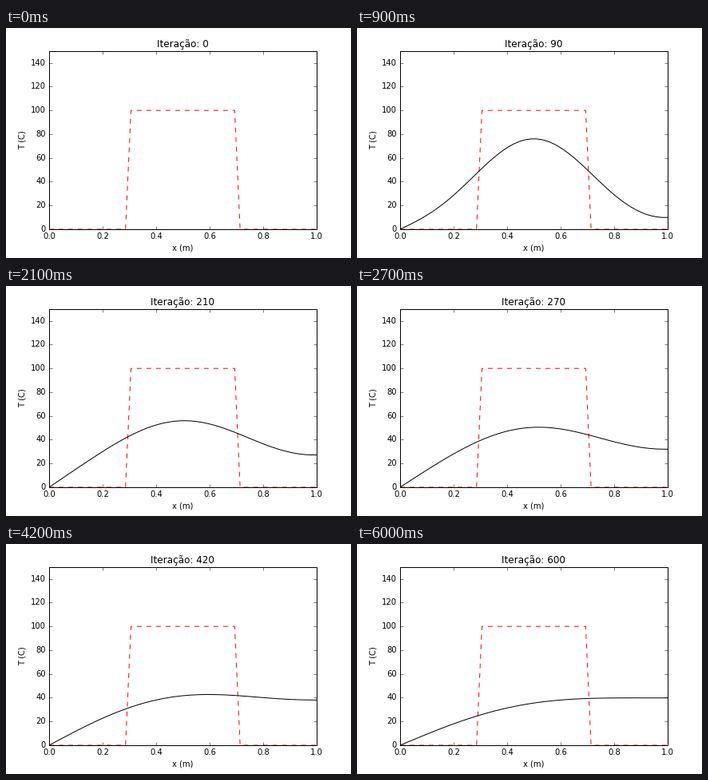
A matplotlib script for the animation above (6.1 s loop, 432 by 288 pixels).

```python
import numpy as np
import matplotlib.pyplot as plt
from matplotlib.animation import FuncAnimation

plt.style.use("classic")
plt.rcParams.update({
    "figure.dpi": 72,
    "savefig.dpi": "figure",
    "figure.facecolor": "white",
    "font.family": "DejaVu Sans",
    "font.size": 10,
})

POINTS = 50
FRAMES = 61
STEPS_PER_FRAME = 10
FOURIER = 0.4  # diffusivity * dt / dx**2

x = np.linspace(0, 1, POINTS)
initial = np.where((x >= 0.3) & (x <= 0.7), 100.0, 0.0)


def diffuse(temp):
    """One explicit step: cold left end, insulated right end."""
    new = temp.copy()
    new[1:-1] += FOURIER * (temp[2:] - 2 * temp[1:-1] + temp[:-2])
    new[0] = 0
    new[-1] = new[-2]
    return new


def solve():
    history = [initial]
    for _ in range(FRAMES - 1):
        temp = history[-1]
        for _ in range(STEPS_PER_FRAME):
            temp = diffuse(temp)
        history.append(temp)
    return history


profiles = solve()

fig = plt.figure(figsize=(6, 4))
fig.subplots_adjust(left=0.125, right=0.9, bottom=0.125, top=0.9)
ax = fig.add_subplot()
ax.plot(x, initial, "r--")
curve, = ax.plot([], [], "k-")
ax.set_xlim(0, 1)
ax.set_ylim(0, 150)
ax.set_xticks(np.linspace(0, 1, 6))
ax.set_yticks(range(0, 150, 20))
ax.set_xlabel("x (m)")
ax.set_ylabel("T (C)")
title = ax.set_title("")


def update(frame):
    # The curve only appears once the first steps are done.
    if frame == 0:
        curve.set_data([], [])
    else:
        curve.set_data(x, profiles[frame])
    title.set_text(f"Iteração: {frame * STEPS_PER_FRAME}")
    return curve, title


anim = FuncAnimation(fig, update, frames=FRAMES, interval=100,
                     init_func=lambda: update(0), repeat=True,
                     repeat_delay=0, blit=False)
plt.show()
```
